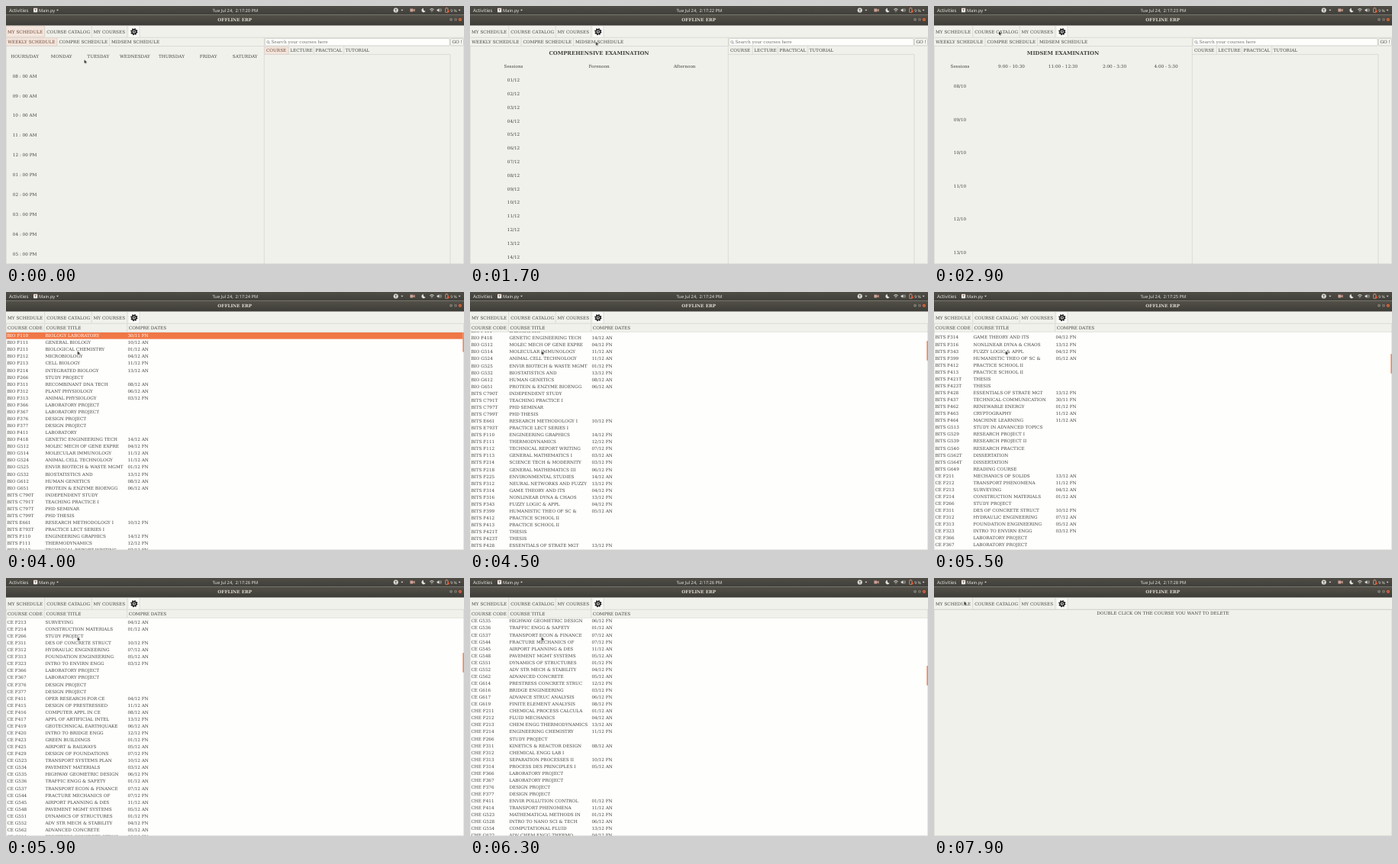
These frames come from a looping animation (600x338 px, 8000 ms). An HTML page:

```html
<!DOCTYPE html>
<html lang="en">
<head>
<meta charset="utf-8">
<title>Offline ERP</title>
<style>
html, body { margin: 0; width: 100%; height: 100%; overflow: hidden; background: #f1f1ec; }
svg { display: block; }
#stage { width: 600px; height: 338px; }
text {
  font: 5.71px "DejaVu Serif", "Noto Serif", serif;
  fill: #42423f; white-space: pre; text-rendering: geometricPrecision;
}
.bar text { font: 5.75px "Open Sans", "Noto Sans", sans-serif; fill: #eeece6; }
.mid { text-anchor: middle; }
.end { text-anchor: end; }
.bold { font-weight: 700; }
.big { font-size: 6.8px; font-weight: 700; }
.hint { fill: #74746f; }
.hot { fill: #6e4534; }
.pale { fill: #fff; }
.line { fill: none; stroke: #cdcdc6; stroke-width: .6; }

.anim, .view { animation: 8s step-end infinite; }
#sched { animation-name: sched; }
#weekly { animation-name: weekly; }
#compre { animation-name: compre; }
#midsem { animation-name: midsem; }
#catalog { animation-name: catalog; }
#mine { animation-name: mine; }
#secs { animation-name: secs; }
#rows { animation-name: rows; }
#thumb { animation-name: thumb; }
#cursor { animation-name: cursor; }

@keyframes sched { 0% { visibility: visible } 42.5%, 100% { visibility: hidden } }
@keyframes weekly { 0% { visibility: visible } 12.5%, 100% { visibility: hidden } }
@keyframes compre { 0% { visibility: hidden } 12.5% { visibility: visible } 28.75%, 100% { visibility: hidden } }
@keyframes midsem { 0% { visibility: hidden } 28.75% { visibility: visible } 42.5%, 100% { visibility: hidden } }
@keyframes catalog { 0% { visibility: hidden } 42.5% { visibility: visible } 93.75%, 100% { visibility: hidden } }
@keyframes mine { 0% { visibility: hidden } 93.75%, 100% { visibility: visible } }
@keyframes secs {
  0% { transform: translateY(0) }
  8.75% { transform: translateY(-12px) }
  21.25% { transform: translateY(-24px) }
  33.75% { transform: translateY(-36px) }
  46.25% { transform: translateY(-48px) }
  58.75% { transform: translateY(-60px) }
  71.25% { transform: translateY(-72px) }
  83.75% { transform: translateY(-84px) }
  96.25%, 100% { transform: translateY(-96px) }
}
@keyframes rows {
  0% { transform: translateY(0) }
  51.25% { transform: translateY(0); animation-timing-function: steps(9, start) }
  62.5% { transform: translateY(-239.3px); animation-timing-function: steps(6, start) }
  70% { transform: translateY(-333.2px); animation-timing-function: steps(8, start) }
  80%, 100% { transform: translateY(-735.2px) }
}
@keyframes thumb {
  0% { transform: translateY(0) }
  51.25% { transform: translateY(0); animation-timing-function: steps(9, start) }
  62.5% { transform: translateY(20.2px); animation-timing-function: steps(6, start) }
  70% { transform: translateY(28.2px); animation-timing-function: steps(8, start) }
  80%, 100% { transform: translateY(62.1px) }
}
@keyframes cursor {
  0% { transform: translate(102.5px, 70px) }
  1.25% { transform: translate(102.5px, 70px); animation-timing-function: steps(7, start) }
  10% { transform: translate(85.5px, 46.5px) }
  15% { transform: translate(85.5px, 46.5px); animation-timing-function: steps(4, start) }
  20% { transform: translate(164.7px, 46.5px) }
  30% { transform: translate(164.7px, 46.5px); animation-timing-function: steps(6, start) }
  37.5% { transform: translate(85px, 33px) }
  43.75% { transform: translate(85px, 33px); animation-timing-function: steps(6, start) }
  51.25% { transform: translate(93.6px, 77px) }
  82.5% { transform: translate(93.6px, 77px); animation-timing-function: steps(3, start) }
  86.25% { transform: translate(126.5px, 17.3px) }
  87.5% { transform: translate(126.5px, 17.3px); animation-timing-function: steps(2, start) }
  90% { transform: translate(126.5px, 40px) }
  95% { transform: translate(126.5px, 40px); animation-timing-function: steps(4, start) }
  100% { transform: translate(39.4px, 30.4px) }
}
</style>
</head>
<body>
<svg id="stage" viewBox="0 0 600 338">
  <defs>
    <linearGradient id="panel" x2="0" y2="1"><stop stop-color="#4e4c45"/><stop offset="1" stop-color="#403f3a"/></linearGradient>
    <linearGradient id="title" x2="0" y2="1"><stop stop-color="#535148"/><stop offset="1" stop-color="#3d3c37"/></linearGradient>
  </defs>
  <rect width="600" height="338" fill="#f1f1ec"/>

  <g class="bar">
    <rect width="600" height="11.5" fill="url(#panel)"/>
    <rect y="11.5" width="600" height="14" fill="url(#title)"/>
    <text x="4" y="7.6" style="font-size:6.2px">Activities</text>
    <rect x="36" y="2.8" width="5.2" height="5.4" rx=".6" fill="#f2f0ec"/>
    <path d="M37.4 4.4h2.4M38.6 4.4v2.4" stroke="#a0553c" stroke-width=".8"/>
    <text x="43" y="7.6">Main.py</text>
    <text x="316.8" y="7.6" class="end">Tue Jul 24,  2:17:2</text>
    <svg x="316" y="0" width="5" height="11"><g id="secs" class="anim"></g></svg>
    <text x="320.1" y="7.6"> PM</text>
    <circle cx="510.7" cy="5.5" r="3.1" fill="#e6e4de"/>
    <path d="M509 4.6h3.4M510.7 3.6v2.2l-1 1.7M510.7 5.8l1 1.7" stroke="#45433d" stroke-width=".6" fill="none"/>
    <path d="M517.4 4.8h3l-1.5 1.8zM66 4.8h3l-1.5 1.8zM592.6 4.8h3l-1.5 1.8z" fill="#dedbd3"/>
    <path d="M529.4 3.5h4v4h-4zM533.6 5l2-1.4v3.8l-2-1.4z" fill="#cfa194"/>
    <path d="M546.8 2.8a2.8 2.8 0 1 0 2.9 4a3 3 0 0 1-2.9-4z" fill="#e6e4de"/>
    <path d="M555.2 4.6a4 4 0 0 1 5.4 0M556.3 6a2.4 2.4 0 0 1 3.2 0M557.9 7.1v.9" stroke="#e6e4de" stroke-width=".9" fill="none"/>
    <path d="M564.6 4.5h1.2l1.7-1.6v5.2l-1.7-1.6h-1.2z" fill="#e6e4de"/>
    <path d="M568.5 4a2.3 2.3 0 0 1 0 3M569.5 3.2a3.4 3.4 0 0 1 0 4.6" stroke="#e6e4de" stroke-width=".5" fill="none"/>
    <rect x="575.6" y="3" width="3.4" height="5.4" rx=".6" fill="none" stroke="#e59a7c" stroke-width=".8"/>
    <path d="M576.5 2.3h1.6" stroke="#e59a7c" stroke-width=".7"/>
    <circle cx="579.3" cy="7" r="1.5" fill="#e25a35"/>
    <text x="582.3" y="7.5" style="font-size:5px">9 %</text>
    <g stroke="#33322e" stroke-width=".5">
      <circle cx="583" cy="17.8" r="2.3" fill="#85837a"/>
      <circle cx="589" cy="17.8" r="2.3" fill="#85837a"/>
      <circle cx="594.9" cy="17.8" r="2.4" fill="#ea6a3d"/>
    </g>
    <path d="M582 17.8h2M588.2 17h1.6v1.6h-1.6zM594.1 17l1.6 1.6M595.7 17l-1.6 1.6" stroke="#45433d" stroke-width=".5" fill="none"/>
  </g>
  <text x="299.7" y="20" class="mid bold" style="fill:#dfdbd2">OFFLINE ERP</text>

  <g id="tabs"></g>
  <rect x="161.3" y="27" width="13" height="13.4" fill="#fbfbf9"/>
  <g fill="none" stroke="#171717">
    <circle cx="167.8" cy="33.7" r="3.9" stroke-width="1.5" stroke-dasharray="1.5 1.563"/>
    <circle cx="167.8" cy="33.7" r="2.8" stroke-width="1.5"/>
    <circle cx="167.8" cy="33.7" r=".6" stroke-width="1.1"/>
  </g>

  <g id="sched" class="view"></g>
  <g id="weekly" class="view"></g>
  <g id="compre" class="view"></g>
  <g id="midsem" class="view"></g>
  <g id="catalog" class="view">
    <g id="heads"></g>
    <svg x="0" y="52.5" width="600" height="285.5">
      <rect width="600" height="286" fill="#fefefd"/>
      <g id="rows" class="anim"></g>
    </svg>
    <path class="line" d="M.3 41.5V337.7H599.7V41.5"/>
    <rect id="thumb" class="anim" x="598.3" y="53" width="1.7" height="25.5" fill="#ee8a60"/>
  </g>
  <g id="mine" class="view"></g>
  <path id="cursor" class="anim" d="M0 0V5.3L1.2 4.3 2 6.1 2.8 5.7 2.1 4H3.7Z" fill="#222" stroke="#fff" stroke-width=".3"/>
</svg>

<script>
const catalog = `=BIO
F110 BIOLOGY LABORATORY 30/11 FN
F111 GENERAL BIOLOGY 10/12 AN
F211 BIOLOGICAL CHEMISTRY 01/12 AN
F212 MICROBIOLOGY 04/12 AN
F213 CELL BIOLOGY 11/12 FN
F214 INTEGRATED BIOLOGY 13/12 AN
F266 STUDY PROJECT
F311 RECOMBINANT DNA TECH 08/12 AN
F312 PLANT PHYSIOLOGY 06/12 AN
F313 ANIMAL PHYSIOLOGY 03/12 FN
F366 LABORATORY PROJECT
F367 LABORATORY PROJECT
F376 DESIGN PROJECT
F377 DESIGN PROJECT
F411 LABORATORY
F418 GENETIC ENGINEERING TECH 14/12 AN
G512 MOLEC MECH OF GENE EXPRE 04/12 FN
G514 MOLECULAR IMMUNOLOGY 11/12 AN
G524 ANIMAL CELL TECHNOLOGY 11/12 AN
G525 ENVIR BIOTECH & WASTE MGMT 01/12 FN
G532 BIOSTATISTICS AND 13/12 FN
G612 HUMAN GENETICS 08/12 AN
G651 PROTEIN & ENZYME BIOENGG 06/12 AN
=BITS
C790T INDEPENDENT STUDY
C791T TEACHING PRACTICE I
C797T PHD SEMINAR
C799T PHD THESIS
E661 RESEARCH METHODOLOGY I 10/12 FN
E793T PRACTICE LECT SERIES I
F110 ENGINEERING GRAPHICS 14/12 FN
F111 THERMODYNAMICS 12/12 FN
F112 TECHNICAL REPORT WRITING 07/12 FN
F113 GENERAL MATHEMATICS I 03/12 AN
F214 SCIENCE TECH & MODERNITY 03/12 FN
F218 GENERAL MATHEMATICS III 06/12 FN
F225 ENVIRONMENTAL STUDIES 14/12 AN
F312 NEURAL NETWORKS AND FUZZY 13/12 FN
F314 GAME THEORY AND ITS 04/12 FN
F316 NONLINEAR DYNA & CHAOS 13/12 FN
F343 FUZZY LOGIC & APPL 04/12 FN
F399 HUMANISTIC THEO OF SC & 05/12 AN
F412 PRACTICE SCHOOL II
F413 PRACTICE SCHOOL II
F421T THESIS
F423T THESIS
F428 ESSENTIALS OF STRATE MGT 13/12 FN
F437 TECHNICAL COMMUNICATION 30/11 FN
F462 RENEWABLE ENERGY 01/12 FN
F463 CRYPTOGRAPHY 11/12 AN
F464 MACHINE LEARNING 11/12 AN
G513 STUDY IN ADVANCED TOPICS
G529 RESEARCH PROJECT I
G539 RESEARCH PROJECT II
G540 RESEARCH PRACTICE
G562T DISSERTATION
G564T DISSERTATION
G649 READING COURSE
=CE
F211 MECHANICS OF SOLIDS 13/12 AN
F212 TRANSPORT PHENOMENA 11/12 FN
F213 SURVEYING 04/12 AN
F214 CONSTRUCTION MATERIALS 01/12 AN
F266 STUDY PROJECT
F311 DES OF CONCRETE STRUCT 10/12 FN
F312 HYDRAULIC ENGINEERING 07/12 AN
F313 FOUNDATION ENGINEERING 05/12 AN
F323 INTRO TO ENVIRN ENGG 03/12 FN
F366 LABORATORY PROJECT
F367 LABORATORY PROJECT
F376 DESIGN PROJECT
F377 DESIGN PROJECT
F411 OPER RESEARCH FOR CE 04/12 FN
F415 DESIGN OF PRESTRESSED 11/12 AN
F416 COMPUTER APPL IN CE 08/12 AN
F417 APPL OF ARTIFICIAL INTEL 13/12 FN
F419 GEOTECHNICAL EARTHQUAKE 06/12 AN
F420 INTRO TO BRIDGE ENGG 12/12 FN
F423 GREEN BUILDINGS 01/12 FN
F425 AIRPORT & RAILWAYS 05/12 AN
F429 DESIGN OF FOUNDATIONS 07/12 FN
G523 TRANSPORT SYSTEMS PLAN 10/12 AN
G534 PAVEMENT MATERIALS 03/12 AN
G535 HIGHWAY GEOMETRIC DESIGN 06/12 FN
G536 TRAFFIC ENGG & SAFETY 01/12 AN
G537 TRANSPORT ECON & FINANCE 07/12 AN
G544 FRACTURE MECHANICS OF 07/12 FN
G545 AIRPORT PLANNING & DES 11/12 AN
G548 PAVEMENT MGMT SYSTEMS 05/12 AN
G551 DYNAMICS OF STRUCTURES 01/12 FN
G552 ADV STR MECH & STABILITY 04/12 FN
G562 ADVANCED CONCRETE 05/12 AN
G614 PRESTRESS CONCRETE STRUC 12/12 FN
G616 BRIDGE ENGINEERING 03/12 FN
G617 ADVANCE STRUC ANALYSIS 06/12 FN
G619 FINITE ELEMENT ANALYSIS 08/12 FN
=CHE
F211 CHEMICAL PROCESS CALCULA 01/12 AN
F212 FLUID MECHANICS 04/12 AN
F213 CHEM ENGG THERMODYNAMICS 13/12 AN
F214 ENGINEERING CHEMISTRY 11/12 FN
F266 STUDY PROJECT
F311 KINETICS & REACTOR DESIGN 08/12 AN
F312 CHEMICAL ENGG LAB I
F313 SEPARATION PROCESSES II 10/12 FN
F314 PROCESS DES PRINCIPLES I 05/12 AN
F366 LABORATORY PROJECT
F367 LABORATORY PROJECT
F376 DESIGN PROJECT
F377 DESIGN PROJECT
F411 ENVIR POLLUTION CONTROL 01/12 FN
F414 TRANSPORT PHENOMENA 11/12 AN
G523 MATHEMATICAL METHODS IN 01/12 FN
G528 INTRO TO NANO SCI & TECH 06/12 AN
G554 COMPUTATIONAL FLUID 13/12 FN
G622 ADV CHEM ENGG THERMO 04/12 FN
G641 REACTION ENGINEERING 08/12 FN`;

const fill = (id, parts) => document.getElementById(id).innerHTML = parts.flat().join('');
// y is the middle of the capitals
const label = (x, y, str, cls = '') =>
  `<text x="${x}" y="${(y + 2.1).toFixed(2)}" class="${cls}">${str.replace('&', '&amp;')}</text>`;
const line = d => `<path class="line" d="${d}"/>`;
const hot = (x, y, w, h) =>
  `<rect x="${x}" y="${y}" width="${w}" height="${h}" fill="#f4e6dd" stroke="#dcc8bc" stroke-width=".5"/>`;
const two = n => String(n).padStart(2, '0');
const range = (n, fn) => Array.from({ length: n }, (_, i) => fn(i));

fill('secs', range(9, i => `<text x=".8" y="${7.6 + 12 * i}">${i}</text>`));

fill('tabs', [
  line('M0 41.3H600M50.7 26V41M112.2 26V41M158.8 26V41M175 26V41'),
  label(2, 33.6, 'MY SCHEDULE'), label(53.2, 33.6, 'COURSE CATALOG'), label(114.5, 33.6, 'MY COURSES')
]);

fill('sched', [
  line('M0 52.6H338M67 42V52M135.6 42V52M338.3 41.5V338M.3 52.6V337.7H599.7V52.6'),
  line('M338.5 63.4H582V338M370.3 53V63M403.4 53V63M442.6 53V63'),
  label(2.2, 47.2, 'WEEKLY SCHEDULE'), label(69.4, 47.2, 'COMPRE SCHEDULE'), label(138, 47.2, 'MIDSEM SCHEDULE'),
  '<rect x="339.2" y="42.6" width="242" height="9.4" rx="1.3" fill="#fefefd" stroke="#b9b7b0" stroke-width=".6"/>',
  '<path d="M344.2 48.2l1.4 1.4" stroke="#777" stroke-width=".8"/><circle cx="343.2" cy="47.1" r="1.5" fill="none" stroke="#777" stroke-width=".6"/>',
  label(347.4, 47.2, 'Search your courses here', 'hint'),
  '<rect x="582.3" y="42.6" width="17.2" height="9.4" rx="1.3" fill="#f4f4f0" stroke="#b9b7b0" stroke-width=".6"/>',
  label(584.4, 47.2, 'GO !'),
  label(341, 58, 'COURSE'), label(372.2, 58, 'LECTURE'), label(405.3, 58, 'PRACTICAL'), label(444.5, 58, 'TUTORIAL')
]);

const days = ['HOURS/DAY', 'MONDAY', 'TUESDAY', 'WEDNESDAY', 'THURSDAY', 'FRIDAY', 'SATURDAY'];
fill('weekly', [
  hot(.6, 26.6, 49.6, 14), hot(.6, 42, 65.8, 10), hot(339, 53.4, 30.6, 9.6),
  label(2, 33.6, 'MY SCHEDULE', 'hot'), label(2.2, 47.2, 'WEEKLY SCHEDULE', 'hot'), label(341, 58, 'COURSE', 'hot'),
  days.map((d, i) => label(24.6 + 48.1 * i, 65.6, d, 'mid')),
  range(10, i => label(24.6, 91.6 + 25.87 * i, `${two((i + 7) % 12 + 1)} : 00 ${i < 4 ? 'AM' : 'PM'}`, 'mid'))
]);

fill('compre', [
  label(169, 61.6, 'COMPREHENSIVE EXAMINATION', 'mid big'),
  ['Sessions', 'Forenoon', 'Afternoon'].map((s, i) => label(57 + 112.1 * i, 79.3, s, 'mid')),
  range(14, i => label(57, 97.2 + 17.79 * i, `${two(i + 1)}/12`, 'mid'))
]);

const slots = ['Sessions', '9:00 - 10:30', '11:00 - 12:30', '2:00 - 3:30', '4:00 - 5:30'];
fill('midsem', [
  label(169, 61.6, 'MIDSEM EXAMINATION', 'mid big'),
  slots.map((s, i) => label(34 + 67.5 * i, 79.3, s, 'mid')),
  range(6, i => label(34, 105 + 43.5 * i, `${two(i + 8)}/10`, 'mid'))
]);

fill('heads', [
  line('M0 52.4H600M50.2 42V52M158.6 42V52'),
  label(2, 47.2, 'COURSE CODE'), label(52.6, 47.2, 'COURSE TITLE'), label(160.8, 47.2, 'COMPRE DATES')
]);

let dept = '', n = 0;
const rows = ['<rect width="598.5" height="9.1" fill="#f07746"/>'];
for (const entry of catalog.split('\n')) {
  if (entry[0] === '=') { dept = entry.slice(1); continue; }
  const [, code, title, date = ''] = entry.match(/^(\S+) (.*?)(?: (\d\d\/\d\d [AF]N))?$/);
  const y = 4.6 + 9.067 * n, cls = n ? '' : 'pale';
  rows.push(label(1.4, y, `${dept} ${code}`, cls), label(51.4, y, title, cls), label(159.4, y, date, cls));
  n++;
}
fill('rows', rows);

fill('mine', [
  line('M.3 41.3H599.7V337.7H.3Z'),
  label(300, 45.6, 'DOUBLE CLICK ON THE COURSE YOU WANT TO DELETE', 'mid')
]);
</script>
</body>
</html>
```
